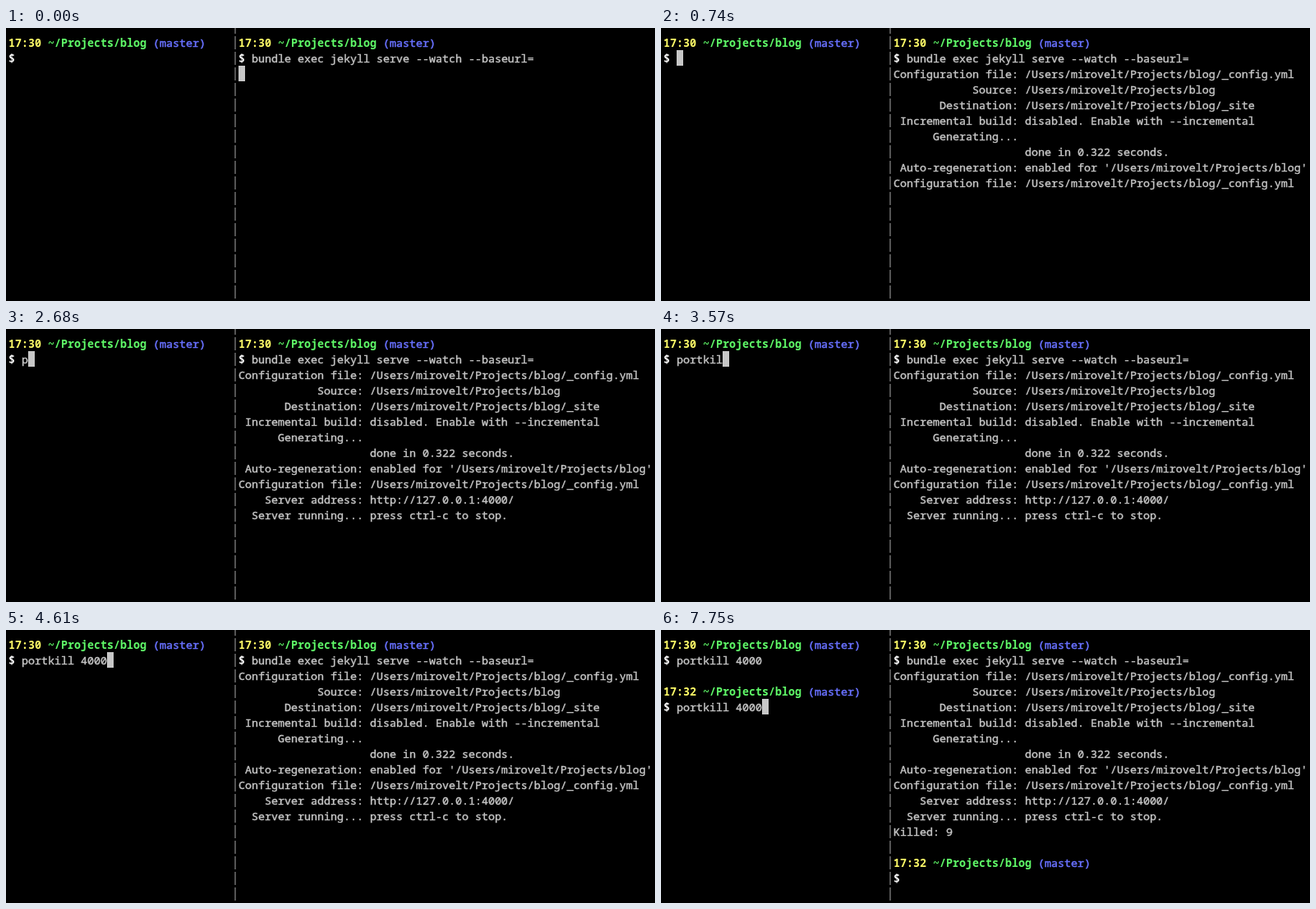
Write an HTML page that moves like this. It is 790 by 333 pixels and loops after 8000 ms.

```html
<!DOCTYPE html>
<html lang="en">
<head>
<meta charset="utf-8">
<title>Terminal</title>
<style>
  html, body { margin: 0; width: 100%; height: 100%; overflow: hidden; background: #000; }

  /* Character cell: 8 x 19 px */
  pre {
    position: absolute; top: 9px; margin: 0; overflow: hidden; color: #c7c7c7;
    font: 400 calc(40px / 3)/19px "Noto Sans Mono", "DejaVu Sans Mono", monospace;
    font-variant-ligatures: none;
    -webkit-text-stroke: 0.4px;
  }
  b { font-weight: 700; color: #fff; -webkit-text-stroke: 0; }
  .time { color: #fffc67; }
  .path { color: #5ffa68; }
  .branch { color: #6871ff; font-weight: 400; -webkit-text-stroke: 0.5px; }

  .left { left: 3px; width: 272px; animation: left-rows 8s step-end infinite; }
  .right { left: 283px; width: 507px; animation: right-rows 8s step-end infinite; }
  .typed { display: inline-block; vertical-align: top; height: 19px; overflow: hidden; }
  .first { animation: type-first 8s step-end infinite; }
  .second { animation: type-second 8s step-end infinite; }

  .divider {
    position: absolute; left: 278px; top: 0; width: 2px; height: 331px;
    background: repeating-linear-gradient(#0000 0 1px, #545454 1px 17px, #0000 17px 19px) 0 -10px / 2px 342px;
  }
  .cursor {
    position: absolute; left: 3px; top: 8px; width: 8px; height: 19px;
    background: #c7c7c7; animation: cursor 8s step-end infinite;
  }

  /* 1% = 80 ms */
  @keyframes right-rows {
    0% { height: 38px; }
    5.5% { height: 133px; }
    9.25% { height: 190px; }
    11% { height: 228px; }
    70.75%, 100% { height: 304px; }
  }
  @keyframes left-rows {
    0% { height: 38px; }
    70.75%, 100% { height: 95px; }
  }
  @keyframes type-first {
    0% { width: 0; }
    33.5% { width: 8px; }
    35.375% { width: 16px; }
    37.25% { width: 24px; }
    39.125% { width: 32px; }
    41% { width: 40px; }
    44.625% { width: 56px; }
    46.5% { width: 64px; }
    48.375% { width: 72px; }
    52.125% { width: 80px; }
    54% { width: 88px; }
    55.875% { width: 96px; }
    57.625%, 100% { width: 104px; }
  }
  @keyframes type-second {
    0% { width: 0; }
    96.875%, 100% { width: 104px; }
  }
  @keyframes cursor {
    0% { transform: translate(280px, 38px); }
    5.5% { transform: translate(280px, 133px); }
    7.375% { transform: translate(16px, 19px); }
    33.5% { transform: translate(24px, 19px); }
    35.375% { transform: translate(32px, 19px); }
    37.25% { transform: translate(40px, 19px); }
    39.125% { transform: translate(48px, 19px); }
    41% { transform: translate(56px, 19px); }
    44.625% { transform: translate(72px, 19px); }
    46.5% { transform: translate(80px, 19px); }
    48.375% { transform: translate(88px, 19px); }
    52.125% { transform: translate(96px, 19px); }
    54% { transform: translate(104px, 19px); }
    55.875% { transform: translate(112px, 19px); }
    57.625% { transform: translate(120px, 19px); }
    68.875% { transform: translate(0, 38px); }
    70.75% { transform: translate(16px, 76px); }
    96.875%, 100% { transform: translate(120px, 76px); }
  }
</style>
</head>
<body>
<pre class="left"><b class="time">17:30</b> <b class="path">~/Projects/blog</b> <b class="branch">(master)</b>
<b>$</b> <span class="typed first">portkill 4000</span>

<b class="time">17:32</b> <b class="path">~/Projects/blog</b> <b class="branch">(master)</b>
<b>$</b> <span class="typed second">portkill 4000</span></pre>
<pre class="right"><b class="time">17:30</b> <b class="path">~/Projects/blog</b> <b class="branch">(master)</b>
<b>$</b> bundle exec jekyll serve --watch --baseurl=
Configuration file: /Users/mirovelt/Projects/blog/_config.yml
            Source: /Users/mirovelt/Projects/blog
       Destination: /Users/mirovelt/Projects/blog/_site
 Incremental build: disabled. Enable with --incremental
      Generating...
                    done in 0.322 seconds.
 Auto-regeneration: enabled for '/Users/mirovelt/Projects/blog'
Configuration file: /Users/mirovelt/Projects/blog/_config.yml
    Server address: http://127.0.0.1:4000/
  Server running... press ctrl-c to stop.
Killed: 9

<b class="time">17:32</b> <b class="path">~/Projects/blog</b> <b class="branch">(master)</b>
<b>$</b></pre>
<div class="divider"></div>
<div class="cursor"></div>
</body>
</html>
```
